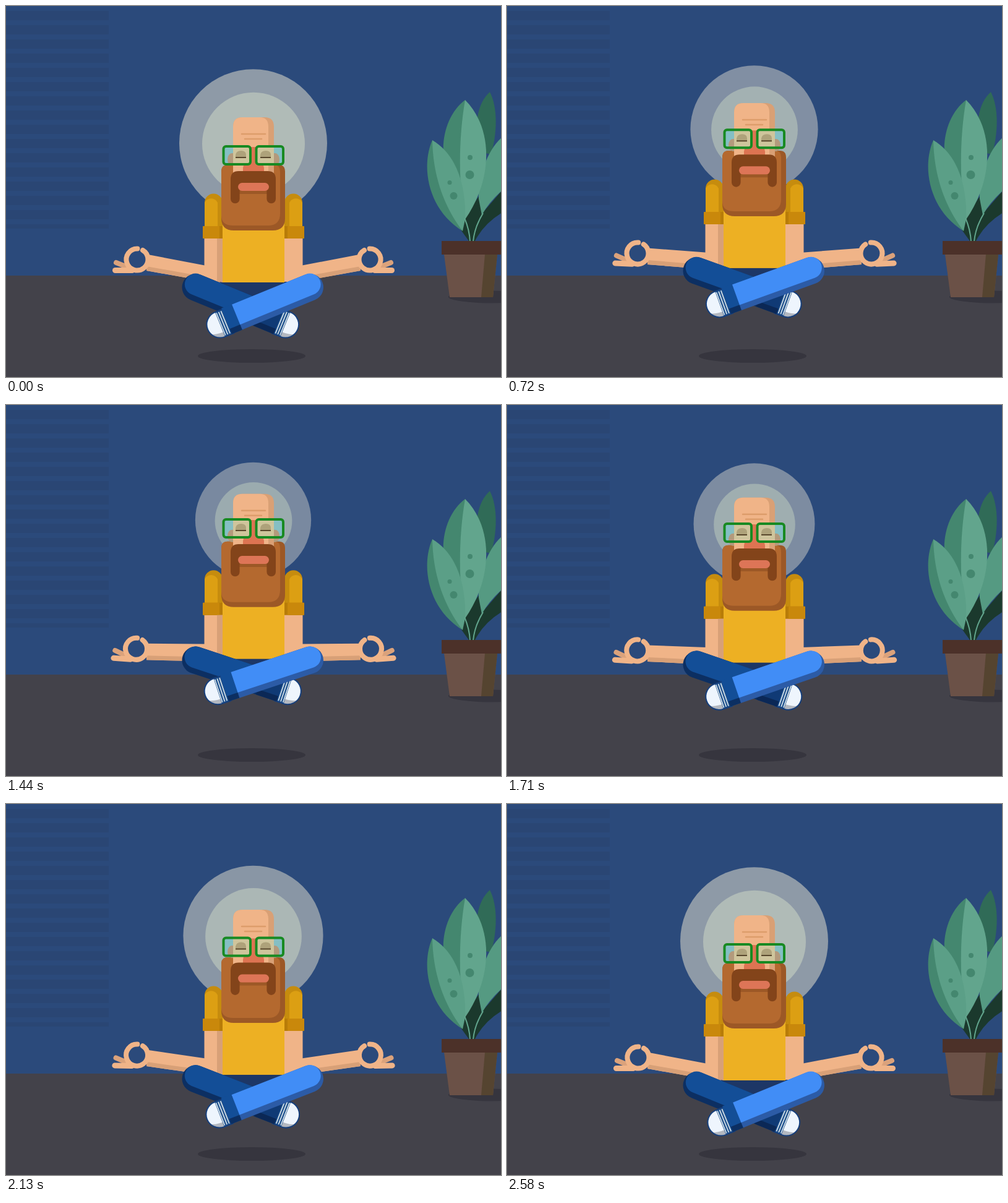
These frames come from a looping animation (800x600 px, 2610 ms). An HTML page:

```html
<!DOCTYPE html>
<html lang="en">
<head>
<meta charset="utf-8">
<title>Levitation</title>
<style>
  html, body { margin: 0; width: 100%; height: 100%; overflow: hidden; background: #2b4a7b; }
  svg { display: block; width: 100%; height: 100%; }
</style>
</head>
<body>
<svg viewBox="0 0 800 600">
  <defs>
    <pattern id="blinds" width="166" height="23" patternUnits="userSpaceOnUse">
      <rect width="166" height="15" y="8" fill="#2a4674"/>
    </pattern>

    <g id="arm">
      <path id="forearm" fill="#f0b488"/>
      <path id="forearmShade" fill="#d8a077"/>
      <g id="hand" fill="none" stroke="#f0b488" stroke-linecap="round">
        <path d="M-34 5L-19 11" stroke="#dba27b" stroke-width="8"/>
        <path d="M-35.500 17.500H-8" stroke-width="9"/>
        <path d="M9 -15A17.500 17.500 0 1 1 .4 -17.500" stroke-width="8"/>
      </g>
      <g class="body">
        <path d="M320.500 370H350V447L320.500 443Z" fill="#f0b488"/>
        <path d="M321 360V318A14 14 0 0 1 350 318V360Z" fill="#c68c0e"/>
        <path d="M321 360V318A12 13 0 0 1 342 318V360Z" fill="#dc9f13"/>
        <rect x="318" y="356" width="33" height="20" rx="1" fill="#b87c08"/>
        <rect x="318" y="356" width="27" height="20" rx="1" fill="#c9880b"/>
      </g>
    </g>

    <!-- Knee at the origin, foot towards +x -->
    <g id="shoe">
      <path d="M142 -21H157A21.500 21.500 0 0 1 157 22H142Z" fill="#eef5fd"/>
      <path d="M144 22H157A21.500 21.500 0 0 0 176 10Q168 15 144 14Z" fill="#b3b8c0"/>
      <path d="M142 -21H157V22H142Z" fill="#1d4f8c"/>
      <path d="M147.500 -19V20M151.500 -19V20M155.500 -19V20" stroke="#cfdde6" stroke-width="1.800"/>
      <path d="M142 -21H157A21.500 21.500 0 0 1 157 22H142Z" fill="none" stroke="#163f7c" stroke-width="2"/>
    </g>
  </defs>

  <rect width="800" height="600" fill="#2b4a7b"/>
  <rect width="166" height="360" fill="url(#blinds)"/>
  <rect y="436" width="800" height="164" fill="#43424a"/>
  <ellipse cx="397" cy="566" rx="87" ry="11" fill="#36353e"/>

  <g id="plant">
    <ellipse cx="787" cy="470.500" rx="72" ry="10" fill="#36353e"/>
    <path d="M782 139C764 155 756 185 762 235L784 240C794 205 795 165 782 139Z" fill="#306b57"/>
    <path d="M742 340L764 308L769 336L802 298V334Q772 352 758 380H748L735 362Z" fill="#1b392d"/>
    <path d="M802 212C775 235 762 285 764 312L769 338Q780 318 802 298Z" fill="#559a82"/>
    <path d="M742 152C707 178 694 240 722 290L742 345Z" fill="#44876f"/>
    <path d="M742 152C785 195 790 275 742 345C731 290 731 215 742 152Z" fill="#62a58d"/>
    <path d="M689 217C670 260 682 330 738 364Z" fill="#44876f"/>
    <path d="M689 217C725 238 744 285 742 345L738 364C708 325 690 275 689 217Z" fill="#5b9f87"/>
    <g fill="#44876f">
      <circle cx="750" cy="245" r="4"/><circle cx="749.500" cy="273" r="7"/>
      <circle cx="717" cy="285.500" r="3.500"/><circle cx="723.500" cy="307" r="6"/>
    </g>
    <path d="M741 343Q749 362 750 381M771 335Q757 358 755 381" fill="none" stroke="#62a58d" stroke-width="2"/>
    <path d="M708 402H794L787 471H717Z" fill="#6b5147"/>
    <path d="M774 402H794L787 471H768Z" fill="#554430"/>
    <rect x="704" y="380" width="96" height="22" fill="#4c3129"/>
  </g>

  <circle id="halo" cx="399.500"/>
  <circle id="haloInner" cx="400"/>

  <use href="#arm"/>
  <use href="#arm" transform="matrix(-1 0 0 1 800 0)"/>

  <g class="body">
    <path d="M345 446H455L430 475H370Z" fill="#1d3766"/>
    <path d="M341 376H350V447L341 445.500Z" fill="#d8a077"/>
    <rect x="350" y="330" width="100" height="117" fill="#edb023"/>
  </g>

  <g id="backLeg">
    <use href="#shoe"/>
    <path d="M145 -22H0A22 22 0 0 0 0 22H145Z" fill="#0c2f62"/>
    <path d="M145 -22H-2A17.500 17.500 0 0 0 -2 13H145Z" fill="#134e97"/>
    <path d="M110 -22H145V22H110Z" fill="#103a75"/>
    <path d="M110 13H145V22H110Z" fill="#0b2856"/>
  </g>
  <g id="frontLeg">
    <use href="#shoe"/>
    <path d="M126 -23H145V22H126Z" fill="#134e97"/>
    <path d="M126 13H145V22H126Z" fill="#0c2f62"/>
    <path d="M127 -22H0A22 22 0 0 0 0 22H127Z" fill="#2c5ba6"/>
    <path d="M127 -22H-2A17.500 17.500 0 0 0 -2 13H127Z" fill="#418df6"/>
  </g>

  <g class="body">
    <path d="M348 268Q348 257 358 257H441Q451 257 451 268V343Q451 363 431 363H368Q348 363 348 343Z" fill="#9c5826"/>
    <path d="M348 268Q348 257 358 257H434Q443 257 443 268V335Q443 355 424 355H367Q348 355 348 339Z" fill="#b4692f"/>
    <path d="M367 275V195Q367 180 382 180H418Q433 180 433 195V275Z" fill="#d9a075"/>
    <path d="M367 275V195Q367 180 382 180H410Q424 180 424 195V275Z" fill="#f0b488"/>
    <path d="M381 207H419M386 215H413" stroke="#dd9d6b" stroke-width="2.500" stroke-linecap="round"/>
  </g>

  <g id="face">
    <path d="M391 228H409L417 262V272H383V262Z" fill="#dd7452"/>
    <path d="M352 227H395V256H352ZM405 227H448V256H405Z" fill="#85bfc4"/>
    <path d="M367 227H395V256H367ZM405 227H433V256H405Z" fill="#cfc59c"/>
  </g>
  <path class="body" d="M367 238H365A7 10 0 0 0 365 258H367ZM433 238H435A7 10 0 0 1 435 258H433Z" fill="#b39a7c"/>
  <g id="features">
    <path d="M371 245V241Q372 234 380 234Q388 234 388 241V245ZM411 245V241Q412 234 420 234Q428 234 428 241V245Z" fill="#aea27a"/>
    <path d="M371 245H388M411 245H428" stroke="#59482c" stroke-width="2"/>
    <path d="M375 298H425V304H375Z" fill="#9c5826"/>
    <path d="M363 312V280Q363 267 376 267H423Q436 267 436 280V312A7.300 7.300 0 0 1 421.400 312V288H377.600V312A7.300 7.300 0 0 1 363 312Z" fill="#83441a"/>
    <rect x="375" y="286" width="50" height="13" rx="6.500" fill="#dd7557"/>
    <g fill="none" stroke="#188a22" stroke-width="4">
      <rect x="351.500" y="227" width="43.500" height="29" rx="4"/>
      <rect x="404.500" y="227" width="43.500" height="29" rx="4"/>
    </g>
  </g>
</svg>

<script>
const LOOP = 2610, RISE = 1280, FALL = 1300, REST = 2600;
const el = id => document.getElementById(id);
const bodyParts = document.querySelectorAll('.body');
const set = (node, attrs) => {
  for (const name in attrs) node.setAttribute(name, attrs[name]);
};
const mix = (a, b, p) => `rgb(${a.map((v, i) => Math.round(v + (b[i] - v) * p))})`;

// cubic-bezier(.5, 0, .5, 1), solved by bisection
function ease(x) {
  let low = 0, high = 1;
  for (let i = 0; i < 24; i++) {
    const s = (low + high) / 2;
    if (1.5 * s * (1 - s) + s ** 3 < x) low = s; else high = s;
  }
  return low * low * (3 - 2 * low);
}

function draw(time) {
  const t = time % LOOP;
  const lift = ease(Math.min(1, t / RISE, Math.max(0, (REST - t) / FALL)));

  bodyParts.forEach(part => set(part, { transform: `translate(0 ${-37 * lift})` }));
  for (const id of ['face', 'features']) set(el(id), { transform: `translate(0 ${-42.7 * lift})` });

  const kneeY = 455 - 43 * lift, tilt = 22.3 - 4 * lift;
  set(el('backLeg'), { transform: `translate(306.5 ${kneeY}) rotate(${tilt})` });
  set(el('frontLeg'), { transform: `translate(491 ${kneeY}) scale(-1 1) rotate(${tilt})` });

  const handX = 212 - 1.5 * lift, handY = 410 - 16 * lift;
  const top = 425 - 39 * lift, bottom = 450 - 35.5 * lift;
  set(el('hand'), { transform: `translate(${handX} ${handY}) rotate(${4 * lift})` });
  set(el('forearm'), { d: `M227 ${handY - 8.5}L350 ${top}V${bottom}L227 ${handY + 18}Z` });
  set(el('forearmShade'), {
    d: `M227 ${handY + 11}L350 ${bottom - 7}V${bottom}L227 ${handY + 18}Z`
  });

  const cy = 221.7 - 36 * lift;
  set(el('halo'), { cy, r: 119.5 - 26.3 * lift, fill: mix([142, 154, 167], [121, 137, 160], lift) });
  set(el('haloInner'), { cy: cy + 1, r: 83 - 21 * lift, fill: mix([176, 187, 183], [155, 171, 175], lift) });
}

function frame() {
  draw(performance.now());
  requestAnimationFrame(frame);
}
frame();
</script>
</body>
</html>
```
